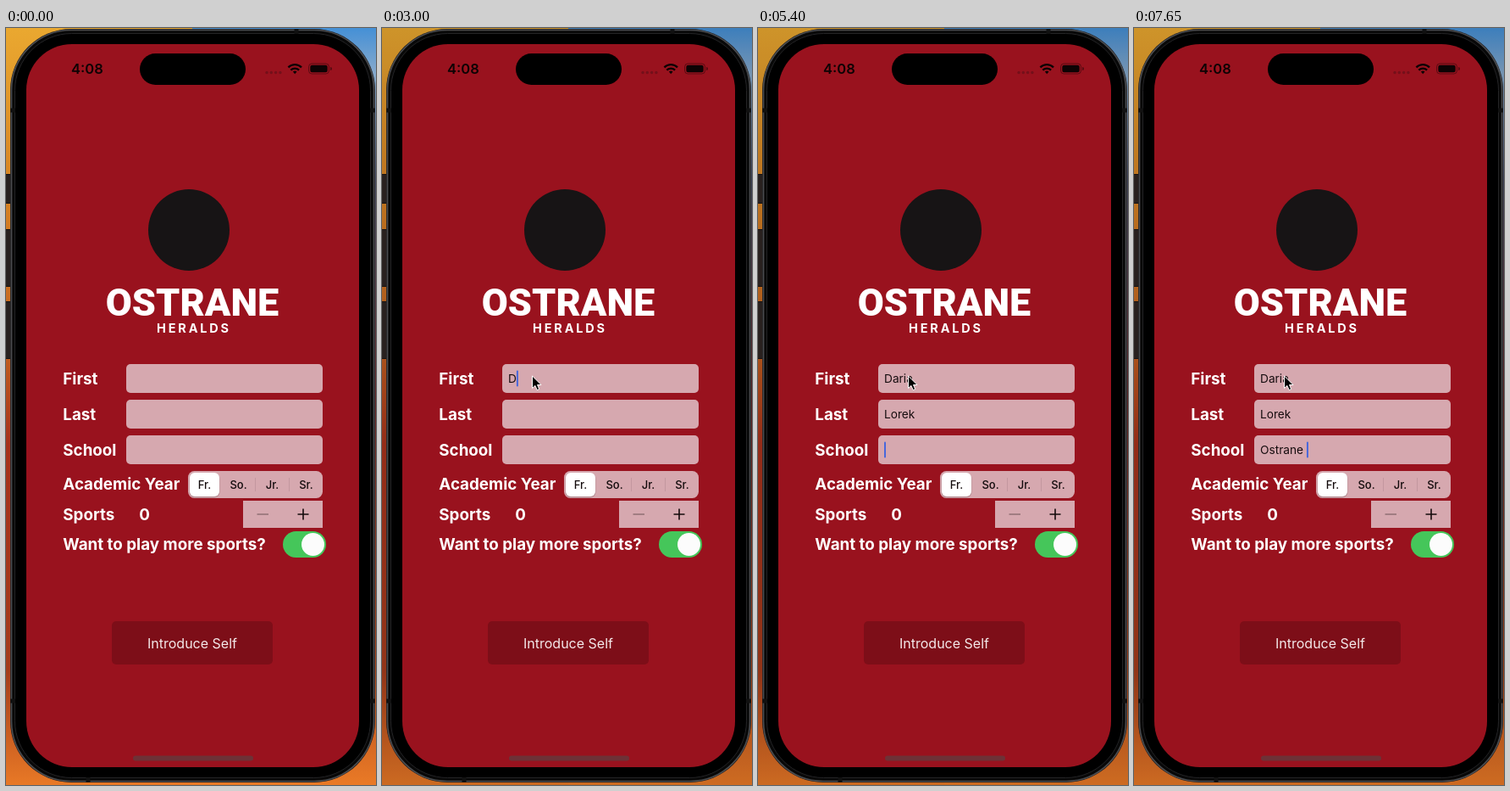
These frames come from a looping animation (437x892 px, 8000 ms). An HTML page:

```html
<!DOCTYPE html>
<html lang="en">
<head>
<meta charset="utf-8">
<title>Student form</title>
<style>
  html, body { margin: 0; width: 100%; height: 100%; overflow: hidden; background: #000; }
  svg { display: block; width: 437px; height: 892px; font-family: Inter, Roboto, sans-serif; }
  text { white-space: pre; }
  .label { font-size: 18.8px; font-weight: 700; fill: #fff; }
  .entry { font-size: 13.7px; fill: #170d0f; }
  .segment { font-size: 13px; font-weight: 500; text-anchor: middle; fill: #130b0c; }
  .mark { text-anchor: middle; fill: #fff; }
</style>
</head>
<body>
<svg viewBox="0 0 437 892" xmlns="http://www.w3.org/2000/svg">
  <defs>
    <linearGradient id="leftWall" x2="0" y2="1">
      <stop offset="0" stop-color="#eaa830"/>
      <stop offset=".2" stop-color="#d98624"/>
      <stop offset=".42" stop-color="#c4621f"/>
      <stop offset=".55" stop-color="#a8321c"/>
      <stop offset=".85" stop-color="#a63c1b"/>
      <stop offset="1" stop-color="#e87926"/>
    </linearGradient>
    <linearGradient id="rightWall" x2="0" y2="1">
      <stop offset="0" stop-color="#4590d6"/>
      <stop offset=".06" stop-color="#86a9cc"/>
      <stop offset=".2" stop-color="#4a4f66"/>
      <stop offset=".5" stop-color="#6b2a2a"/>
      <stop offset=".85" stop-color="#b04a1e"/>
      <stop offset="1" stop-color="#ea7a26"/>
    </linearGradient>
  </defs>

  <!-- Wallpaper -->
  <rect width="220" height="892" fill="url(#leftWall)"/>
  <rect x="220" width="217" height="892" fill="url(#rightWall)"/>
  <rect id="dim" width="437" height="892" opacity="0"/>

  <!-- Phone -->
  <g fill="#29211f" stroke="#151313">
    <rect x="-3" y="172.5" width="10" height="34" rx="2"/>
    <rect x="-3" y="237.5" width="10" height="67" rx="2"/>
    <rect x="-3" y="322.5" width="10" height="67" rx="2"/>
  </g>
  <rect x="5" y="1" width="431" height="888" rx="72" fill="#1c1c1e"/>
  <rect x="6.5" y="2.5" width="428" height="885" rx="70.5" fill="#080808" stroke="#4b4c4f" stroke-width="1.6"/>
  <rect x="10.5" y="6.5" width="420" height="877" rx="67" fill="#000" stroke="#242426"/>
  <path d="M5 97h6M430 97h6M5 793h6M430 793h6M343 1v6M97 883v6" stroke="#111" stroke-width="5"/>
  <rect x="24" y="19" width="393" height="852" rx="54" fill="#99121e"/>

  <!-- Status bar -->
  <rect x="158" y="30" width="125" height="37" rx="18.5"/>
  <text x="77" y="54.3" font-size="16.5" font-weight="600" fill="#0d0304">4:08</text>
  <g fill="#74101a">
    <circle cx="308" cy="52.5" r="1.7"/><circle cx="313.3" cy="52.5" r="1.7"/>
    <circle cx="318.6" cy="52.5" r="1.7"/><circle cx="323.9" cy="52.5" r="1.7"/>
  </g>
  <g fill="none" stroke="#0d0304" stroke-width="2.3">
    <path d="M333.4 46.4a11 11 0 0 1 15.6 0M336.3 49.6a7 7 0 0 1 9.8 0"/>
    <path d="M338.9 51.6a3.4 3.4 0 0 1 4.6 0l-2.3 2.6z" fill="#0d0304" stroke="none"/>
  </g>
  <rect x="357.5" y="42" width="24" height="12" rx="3.8" fill="none" stroke="#000" stroke-opacity=".4"/>
  <rect x="359.3" y="43.8" width="20.4" height="8.4" rx="2.2" fill="#0d0304"/>
  <path d="M383 46v4a2 2 0 0 0 0-4z" fill-opacity=".45"/>

  <!-- Team block -->
  <circle cx="216" cy="238" r="48" fill="#171415"/>
  <text class="mark" x="220" y="339" font-size="45" font-weight="800" style="font-family: Roboto, sans-serif">OSTRANE</text>
  <text class="mark" x="222" y="358.5" font-size="14.5" font-weight="700" letter-spacing="2.8">HERALDS</text>

  <!-- Form -->
  <g class="label">
    <text x="67.3" y="420">First</text>
    <text x="67.3" y="462">Last</text>
    <text x="67.3" y="504">School</text>
    <text x="67.3" y="544">Academic Year</text>
    <text x="67.3" y="580">Sports</text>
    <text x="157.3" y="580">0</text>
    <text x="67.3" y="615">Want to play more sports?</text>
  </g>
  <g id="fields"></g>

  <g fill="#d6a8af">
    <rect x="215" y="522" width="159" height="32" rx="7.5"/>
    <rect x="280" y="557" width="94" height="32"/>
  </g>
  <rect x="216.5" y="524.5" width="36" height="29" rx="6.5" opacity=".15"/>
  <rect x="217" y="524" width="35" height="28" rx="6" fill="#fff"/>
  <path d="M294.5 530v16M334.5 530v16" stroke="#c3979f"/>
  <g id="years"></g>
  <path d="M296.5 573h13.5" stroke="#8b6a6f" stroke-width="1.4"/>
  <path d="M344.5 573h13M351 566.5v13" stroke="#140b0c" stroke-width="1.6"/>

  <rect x="327" y="593" width="51" height="31" rx="15.5" fill="#45c65a"/>
  <circle cx="362.5" cy="608.5" r="13.5" fill="#fcfcfc"/>

  <rect x="125" y="699" width="190" height="51" rx="5" fill="#7d0e18"/>
  <text x="220" y="731" font-size="16" text-anchor="middle" fill="#f4e9ea">Introduce Self</text>
  <rect x="150" y="857.5" width="142" height="6" rx="3" fill="#6d3237"/>

  <rect id="caret" width="2" height="19" rx="1" fill="#4767dc"/>
  <path id="pointer" d="M0 0v14.6l3.4-3.2 2.3 5.2 2.5-1.1-2.2-5h4.6z" stroke="#fff" stroke-width="1" stroke-linejoin="round"/>
</svg>

<script>
const LOOP = 8000;
const TEXT_LEFT = 149;
const values = ['Daria', 'Lorek', 'Ostrane '];

// [start ms, active field, typed letters, caret opacity (default 1)]
const typing = [
  [0, -1, 0, 0],
  [1950, 0, 0], [2700, 0, 0, .5], [2850, 0, 0, 0],
  [3000, 0, 1], [3150, 0, 2], [3300, 0, 4], [3750, 0, 5],
  [3900, 1, 0], [4500, 1, 1], [4800, 1, 3], [4950, 1, 4], [5250, 1, 5],
  [5400, 2, 0], [6000, 2, 0, .5], [6150, 2, 0, 0], [6300, 2, 0, .5], [6450, 2, 0],
  [6600, 2, 1], [6750, 2, 3], [6900, 2, 4], [7050, 2, 5], [7200, 2, 6],
  [7500, 2, 7], [7650, 2, 8]
];

// [start ms, x, y]
const pointerStops = [[750, 305, 479], [900, 246, 446], [1050, 195, 419], [1200, 177.5, 410]];

const byId = id => document.getElementById(id);
const current = (list, t) => list.filter(item => item[0] <= t).pop();

function add(parent, tag, attributes, content = '') {
  const node = document.createElementNS('http://www.w3.org/2000/svg', tag);
  for (const [key, value] of Object.entries(attributes)) node.setAttribute(key, value);
  node.textContent = content;
  return parent.appendChild(node);
}

const entries = values.map((_, i) => {
  const y = 396 + 42 * i;
  add(byId('fields'), 'rect', { x: 142, y, width: 232, height: 34, rx: 5, fill: '#d6a8af' });
  return add(byId('fields'), 'text', { class: 'entry', x: TEXT_LEFT, y: y + 22 });
});

['Fr.', 'So.', 'Jr.', 'Sr.'].forEach((year, i) =>
  add(byId('years'), 'text', { class: 'segment', x: 234.5 + 40 * i, y: 542.5 }, year));

function render(t) {
  const [, active, count, opacity = 1] = current(typing, t);
  entries.forEach((entry, i) => {
    const letters = i < active ? values[i].length : i === active ? count : 0;
    entry.textContent = values[i].slice(0, letters);
  });

  const caret = byId('caret');
  caret.setAttribute('opacity', opacity);
  if (active >= 0) {
    const width = count ? entries[active].getComputedTextLength() : 0;
    caret.setAttribute('x', TEXT_LEFT + width);
    caret.setAttribute('y', 403.5 + 42 * active);
  }

  const stop = current(pointerStops, t);
  const pointer = byId('pointer');
  pointer.setAttribute('visibility', stop ? 'visible' : 'hidden');
  if (stop) pointer.setAttribute('transform', `translate(${stop[1]} ${stop[2]})`);

  byId('dim').setAttribute('opacity', t < 1650 ? 0 : .12);
}

const start = performance.now();
function tick() {
  render((performance.now() - start) % LOOP);
  requestAnimationFrame(tick);
}
tick();
</script>
</body>
</html>
```
